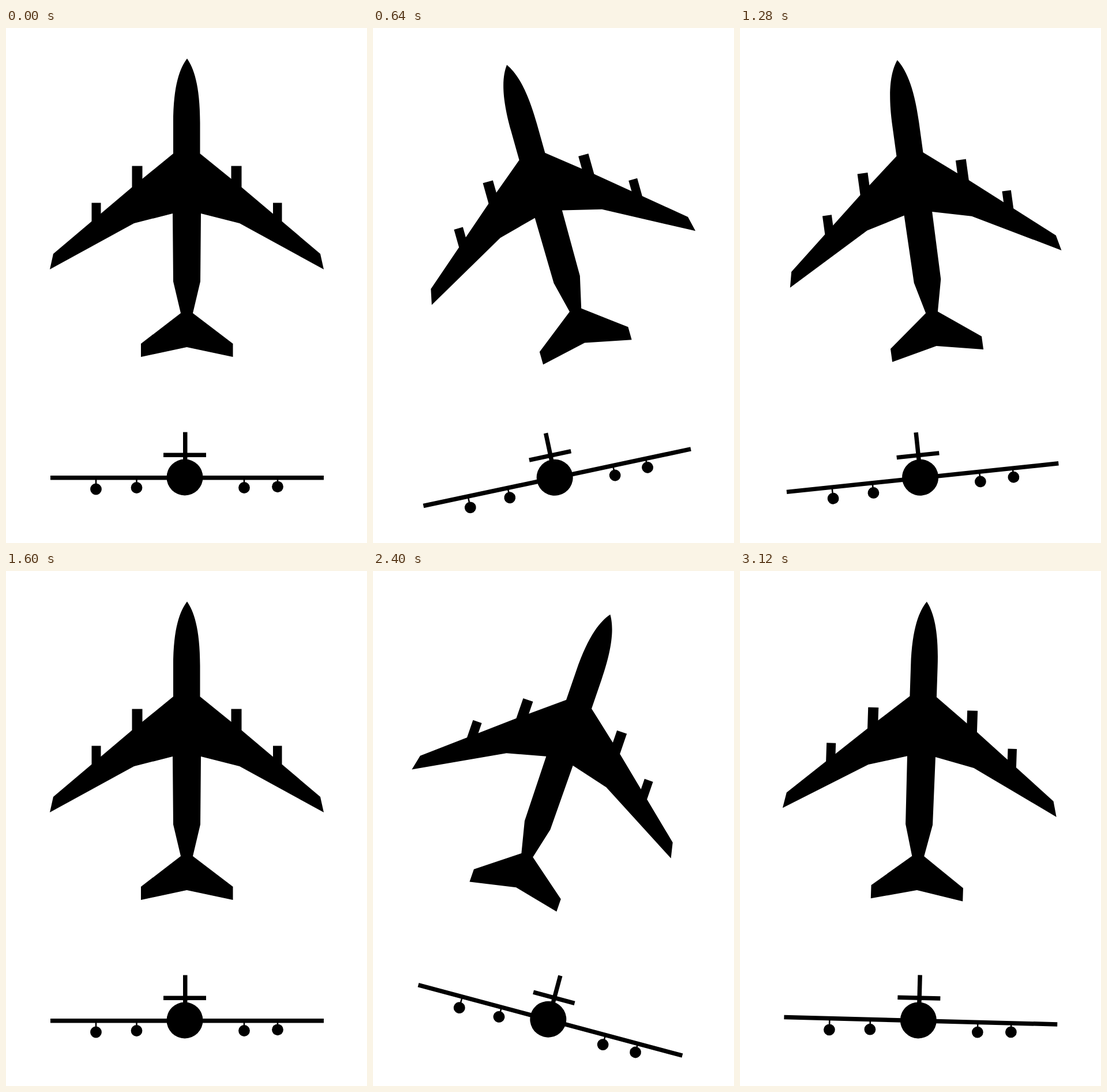
An HTML page for the animation above (3.2 s loop, 626 by 894 pixels).

```html
<!DOCTYPE html>
<html lang="en">
<head>
<meta charset="utf-8">
<title>Banking aircraft</title>
<style>
  html, body { margin: 0; width: 100%; height: 100%; overflow: hidden; background: #fff; }
  svg { display: block; width: 626px; height: 894px; }
</style>
</head>
<body>
<svg viewBox="0 0 626 894">
  <g id="plan">
    <path d="M314 53C302 69 290 98 290 165V218L219 276L82 392L76 419L222 339L289 322L290 440L303 495L234 548V571L313.5 554L393.5 571V548L324 495L337 440L338 322L405 339L551 419L545 392L408 276L336.500 218V165C336.500 98 325 69 314 53Z"/>
    <path d="M218.500 239.500H236.500V285H218.500ZM148.500 303.500H164.500V345H148.500ZM390.500 239.500H408.500V285H390.500ZM463 303.500H478.500V345H463Z"/>
  </g>
  <g id="front">
    <rect x="77" y="777" width="474" height="7.500"/>
    <rect x="307" y="701.500" width="7.500" height="55"/>
    <rect x="273" y="737.500" width="74" height="7.500"/>
    <circle cx="310" cy="780" r="31.500"/>
  </g>
</svg>
<script>
  const FRAME_MS = 80, FRAMES = 40;
  const plan = document.getElementById('plan');
  const front = document.getElementById('front');

  function add(parent, tag, attrs) {
    const node = document.createElementNS('http://www.w3.org/2000/svg', tag);
    for (const key in attrs) node.setAttribute(key, attrs[key]);
    parent.append(node);
  }

  for (const [cx, cy] of [[156, 800.5], [226.5, 798], [413, 798], [471, 796.3]]) {
    add(front, 'rect', { x: cx - 1.3, y: 782, width: 2.6, height: cy - 782 });
    add(front, 'circle', { cx, cy, r: 9.9 });
  }

  // Triangle wave: -1 is full left bank, +1 is full right bank.
  function bankAt(frame) {
    const phase = (frame + FRAMES / 4) % FRAMES / FRAMES;
    return 4 * Math.abs(phase - 0.5) - 1;
  }

  function render(ms) {
    const bank = bankAt(Math.floor(ms / FRAME_MS) % FRAMES);
    const left = bank < 0;
    const turn = bank * (left ? 19.6 : 18.95);
    const dx = bank * (left ? 17.75 : 16);
    const dy = bank * bank * (left ? 2.8 : 8.8);
    plan.setAttribute('transform', `translate(${dx} ${dy}) rotate(${turn} 313.5 303.5)`);
    front.setAttribute('transform', `rotate(${bank * 15} 314 755.5)`);
  }

  const start = performance.now();
  function tick(now) {
    render(Math.max(0, now - start));
    requestAnimationFrame(tick);
  }
  render(0);
  requestAnimationFrame(tick);
</script>
</body>
</html>
```
